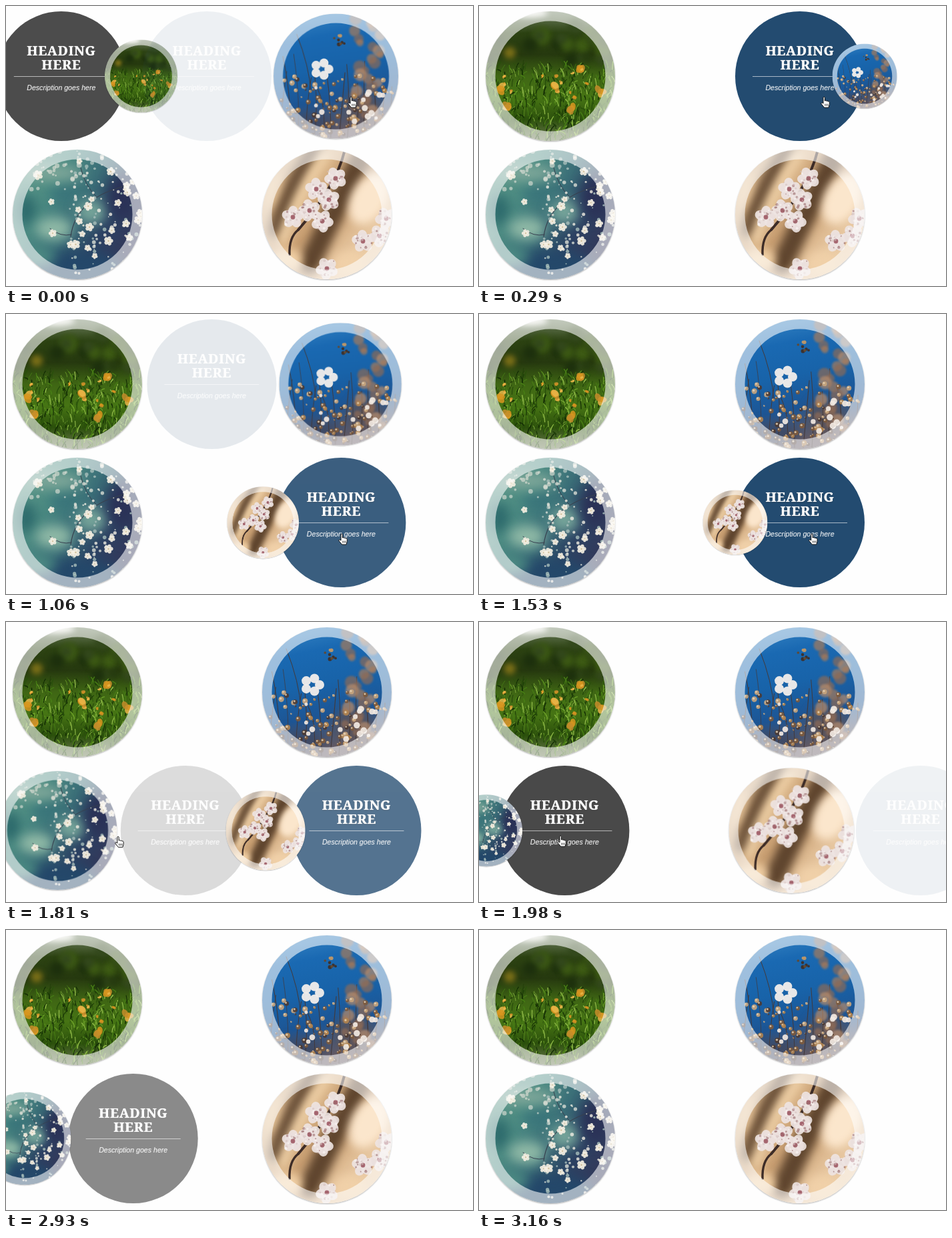
Recreate the animation shown at these times as an HTML page with a canvas. Size 700 px wide and 419 px high, loop 3990 ms.

```html
<!DOCTYPE html>
<html lang="en">
<head>
<meta charset="utf-8">
<title>Circle hover effect</title>
<style>
html, body { margin: 0; width: 100%; height: 100%; overflow: hidden; background: #fefefe; }
.item, .info, canvas { position: absolute; width: 194px; height: 194px; }
.info, canvas { left: 0; top: 0; border-radius: 50%; }
.info { color: #fff; text-align: center; }
canvas { box-shadow: 0 1px 2px rgba(0,0,0,.3); }
h3 {
  position: absolute; top: 47.5px; width: 100%; margin: 0;
  font: bold 20px/21px "Noto Serif", serif; letter-spacing: .6px;
  text-shadow: 0 0 1px #fff, 0 1px 2px rgba(0,0,0,.3);
}
p {
  position: absolute; top: 97px; left: 26px; width: 142px; margin: 0; padding-top: 9px;
  border-top: 1px solid rgba(255,255,255,.6);
  font: italic 10.6px/14px "Liberation Sans", Arial, sans-serif;
  color: rgba(255,255,255,.8); text-shadow: 0 0 1px rgba(255,255,255,.5);
}
#hand { position: absolute; left: 0; top: 0; }
</style>
</head>
<body>
<svg id="hand" width="16" height="18" viewBox="0 0 16 18">
  <path d="M4 11V2.2C4 .6 6.4 .6 6.4 2.2V7C7 6 8.6 6.2 8.8 7.4C9.5 6.6 10.8 6.9 11.1 8C12 7.4 13.3 8 13.3 9.2V12.5L12 17H5.6L1.2 11.6C.4 10.3 1.9 9.2 3 10Z"
    fill="#fff" stroke="#111" stroke-linejoin="round"/>
  <path d="M6.8 11.5V14.5M8.9 11.5V14.5M11 11.5V14.5" stroke="#111" stroke-width=".8"/>
</svg>
<script>
const LOOP = 3990, FADE = 350, SIZE = 194, TAU = Math.PI * 2;
let g, seed = 7;

const rnd = (a = 0, b = 1) => {
  seed = (seed * 16807) % 2147483647;
  return a + (b - a) * seed / 2147483647;
};
const pick = (...list) => list[Math.floor(rnd(0, list.length))];
const times = (n, fn) => { for (let i = 0; i < n; i++) fn(i); };

// Painting helpers, all in stage coordinates
function fillAll(x, y, w, h, ...colors) {
  const grad = g.createLinearGradient(x, y, x + w, y + h);
  colors.forEach((c, i) => grad.addColorStop(i / (colors.length - 1), c));
  g.fillStyle = grad;
  g.fillRect(0, 0, 700, 419);
}
function blurred(px, fn) {
  g.filter = `blur(${px}px)`;
  fn();
  g.filter = 'none';
}
function dot(x, y, r, color, alpha = 1, ry = r, turn = 0) {
  g.globalAlpha = alpha;
  g.fillStyle = color;
  g.beginPath();
  g.ellipse(x, y, r, ry, turn, 0, TAU);
  g.fill();
  g.globalAlpha = 1;
}
function curve(color, width, x, y, cx, cy, u, v) {
  g.strokeStyle = color;
  g.lineWidth = width;
  g.beginPath();
  g.moveTo(x, y);
  g.quadraticCurveTo(cx, cy, u, v);
  g.stroke();
}
function flower(x, y, r, petal, heart) {
  const turn = rnd(0, TAU);
  times(5, i => {
    const a = turn + i * TAU / 5;
    dot(x + Math.cos(a) * r * .52, y + Math.sin(a) * r * .52, r * .48, petal, .9, r * .42, a);
  });
  dot(x, y, r * .2, heart, .75);
}

function meadow() {
  fillAll(0, 8, 0, 194, '#6f8060', '#2c4212', '#26390f', '#3f6614', '#467414', '#2c500c', '#6d7a52');
  blurred(4, () => {
    times(22, () => dot(rnd(15, 200), rnd(28, 85), rnd(6, 14), pick('#1d300d', '#33481c', '#3d5a14', '#263a10')));
    dot(46, 70, 9, '#7c7018');
    dot(75, 10, 28, '#f4f4ee', 1, 7);
  });
  times(750, () => {
    const x = rnd(8, 206), y = rnd(92, 206), h = rnd(3, 13);
    const color = pick('#6b9f28', '#1d3c08', '#8bb545', '#28500b', '#477d15', '#142d05', '#365f10');
    curve(color, rnd(.6, 1.7), x, y, x, y - h / 2, x + rnd(-6, 6), y - h);
  });
  const leaf = (x, y, r) => times(3, () =>
    dot(x + rnd(-.4, .4) * r, y + rnd(-.4, .4) * r, r * .6, pick('#d8951f', '#eab64a', '#c68d2a'), .85, r * .4, rnd(-1.5, 1.5)));
  for (const [x, y] of [[33, 124], [115, 120], [137, 152], [182, 128], [150, 98], [42, 149]]) leaf(x, y, 11);
  times(12, () => leaf(rnd(20, 190), rnd(95, 140), rnd(3, 6)));
}

function berries() {
  fillAll(384, 8, 40, 194, '#3a88c6', '#1a69b2', '#1863a9', '#1d5594', '#665a62');
  blurred(8, () => {
    dot(520, 155, 28, '#5d5357', .8);
    dot(440, 180, 40, '#3a4560', .7, 18);
  });
  times(14, i => {
    const x = 395 + i * 13, y = rnd(70, 140);
    curve('#43393a', rnd(.7, 1.4), x, 200, x + rnd(-4, 12), 150, x + rnd(-14, 14), y);
  });
  curve('#43393a', 1, 442, 130, 440, 90, 420, 40);
  blurred(1.5, () => times(26, i =>
    dot(522 + rnd(-14, 28), 16 + i * 6.2, rnd(5, 10), pick('#a67a5a', '#8c6a55', '#b58c6c'), .7)));
  times(150, () => {
    const x = rnd(390, 574), y = 202 - 100 * rnd() ** 1.3, r = rnd(1, 4.2);
    dot(x, y, r, pick('#b0834f', '#7d5a3c', '#c9a57c', '#4d3a32'), .9);
    dot(x - 1, y - 1, r * .4, '#ead8bd', .8);
  });
  times(9, () => dot(487 + rnd(-9, 9), 49 + rnd(-7, 7), rnd(1.5, 3.5), pick('#604a35', '#b8956a', '#3c3230')));
  times(5, i => dot(459 + 11 * Math.cos(i * TAU / 5), 94 + 10 * Math.sin(i * TAU / 5), 7, '#f2eeeb', .95));
  times(16, () => dot(rnd(440, 565), 180 - 68 * rnd(), rnd(2.5, 5), '#f2e9e2', .92));
}

function spring() {
  fillAll(30, 250, 165, 90, '#5b9789', '#4b8a82', '#3b6f78', '#2c4263', '#33385a');
  blurred(9, () => {
    dot(105, 392, 70, '#24486a', 1, 26);
    dot(30, 305, 16, '#2d6a6c', 1, 24);
    dot(90, 282, 24, '#39747a', 1, 12);
    dot(72, 250, 44, '#86ab9d', 1, 10);
    dot(72, 333, 28, '#8fb9a6', 1, 17);
    dot(128, 308, 22, '#76a59a', 1, 18);
    dot(175, 285, 22, '#2b3257', 1, 34);
    dot(50, 375, 24, '#4d8c83', 1, 14);
  });
  curve('#37404f', 1.2, 97, 345, 105, 285, 185, 268);
  curve('#37404f', 1, 135, 285, 118, 268, 112, 242);
  curve('#37404f', 1, 66, 333, 82, 346, 98, 342);
  const bloom = (x, y) => flower(x, y, rnd(4.5, 7.5), '#f5efe2', '#cdbb93');
  times(130, () => dot(rnd(95, 206), rnd(225, 400), rnd(.8, 3), pick('#f1eee2', '#d9ddd5', '#a9bfbb'), .8));
  times(45, () => dot(rnd(15, 125), rnd(216, 275), rnd(1, 4), '#e4e4da', .6));
  for (const [x, y] of [[48, 253], [68, 293], [70, 340], [97, 357], [133, 374], [110, 322]]) bloom(x, y);
  times(26, i => bloom(202 - 105 * rnd() ** 1.5, 232 + i * 5.2));
}

function cherry() {
  fillAll(384, 215, 194, 194, '#c9aa86', '#d9b58a', '#c99f72', '#e9c9a2', '#ecd2b0');
  blurred(7, () => {
    curve('#6a5038', 25, 462, 215, 425, 270, 405, 335);
    curve('#efd0a6', 17, 478, 225, 440, 280, 415, 350);
    curve('#5f452e', 32, 535, 222, 500, 290, 455, 385);
    dot(545, 288, 27, '#fbe6cc', 1, 42, .5);
    dot(420, 380, 24, '#f0cfa4', 1, 18);
    dot(515, 385, 24, '#f0d0a8', 1, 18);
    dot(398, 275, 9, '#e7c59a', 1, 30, .3);
  });
  curve('#3d2c27', 4, 508, 215, 495, 270, 438, 335);
  curve('#3d2c27', 3.4, 438, 335, 424, 346, 425, 372);
  const bloom = (x, y, r) => {
    dot(x, y, r * .75, '#c9b0ae', .9);
    flower(x, y, r, '#eee4e2', '#8f3f4c');
    times(16, () => dot(x + rnd(-.7, .7) * r, y + rnd(-.7, .7) * r, rnd(.8, 2.2), pick('#fbf7f5', '#d3bfbe', '#9a6a6c'), .6));
  };
  times(5, i => bloom(482 - 5 * i + (i % 2 ? -12 : 12), 258 + 16 * i, 17));
  for (const [x, y] of [[430, 316], [535, 352], [560, 344], [570, 318], [481, 393]]) bloom(x, y, 17);
}

// dir: side the photo moves to; on / off: when the pointer enters and leaves
const items = [
  { x: 10, y: 8, dir: 1, color: '#333', paint: meadow, on: -900, off: -85 },
  { x: 384, y: 8, dir: 1, color: '#234b70', paint: berries, on: -65, off: 792 },
  { x: 10, y: 215, dir: -1, color: '#333', paint: spring, on: 1712, off: 2770 },
  { x: 384, y: 215, dir: -1, color: '#234b70', paint: cherry, on: 792, off: 1695 }
];
const hand = document.getElementById('hand');

for (const it of items) {
  const box = document.createElement('div');
  box.className = 'item';
  box.style.cssText = `left:${it.x}px;top:${it.y}px`;
  box.innerHTML = `<div class="info" style="background:${it.color}"><h3>HEADING<br>HERE</h3><p>Description goes here</p></div>
    <canvas width="${SIZE}" height="${SIZE}"></canvas>`;
  hand.before(box);
  [it.info, it.photo] = box.children;
  g = it.photo.getContext('2d');
  g.lineCap = g.lineJoin = 'round';
  g.translate(-it.x, -it.y);
  it.paint();
  g.strokeStyle = 'rgba(255,255,255,.58)';
  g.lineWidth = 30;
  g.beginPath();
  g.arc(it.x + 97, it.y + 97, 97.5, 0, TAU);
  g.stroke();
}

// cubic-bezier(.42, 0, .58, 1)
function ease(x) {
  if (x <= 0) return 0;
  if (x >= 1) return 1;
  let lo = 0, hi = 1, s;
  times(20, () => {
    s = (lo + hi) / 2;
    if (1.26 * s * (1 - s) ** 2 + 1.74 * s * s * (1 - s) + s ** 3 < x) lo = s; else hi = s;
  });
  return s * s * (3 - 2 * s);
}

// Each pointer move eases on from where the last one ended
const moves = [
  { at: 650, time: 300, x: 505, y: 336 },
  { at: 1500, time: 410, x: 124, y: 327 },
  { at: 2600, time: 300, x: -30, y: 320 }
];
function pointer(t) {
  let x = 519, y = 143;
  for (const m of moves) {
    const f = ease((t - m.at) / m.time);
    x += (m.x - x) * f;
    y += (m.y - y) * f;
  }
  return [x, y];
}

function draw(t) {
  for (const { info, photo, dir, on, off } of items) {
    const p = ease((t - on) / FADE) - ease((t - off) / FADE);
    info.style.opacity = p;
    info.style.transform = `translateX(${-dir * (1 - p) * 100}%)`;
    photo.style.transform = `scale(${1 - p / 2}) translateX(${dir * p * 100}%)`;
  }
  const [x, y] = pointer(t);
  hand.style.transform = `translate(${x - 7}px, ${y - 8}px)`;
}

const start = performance.now();
function tick() {
  draw((performance.now() - start) % LOOP);
  requestAnimationFrame(tick);
}
tick();
</script>
</body>
</html>
```
